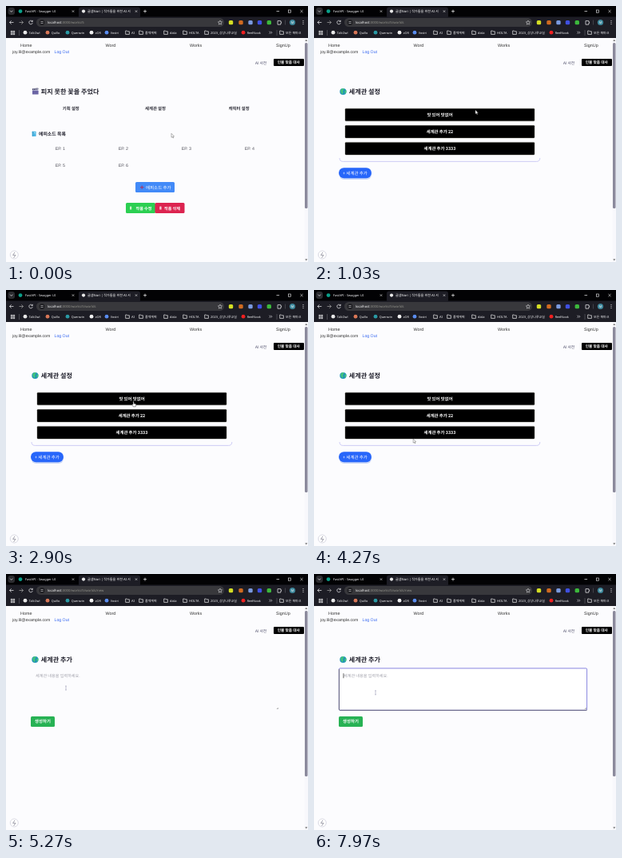
Animation, 378 px wide and 320 px high, one loop 8000 ms. Source, as an HTML page:

```html
<!DOCTYPE html>
<html lang="en">
<head>
<meta charset="utf-8">
<style>
  html, body { margin: 0; width: 100%; height: 100%; overflow: hidden; background: #fcfcfe; }
  svg { display: block; width: 100vw; height: 100vh; }
  text { font-family: "Noto Sans", "Noto Sans CJK KR", "Noto Sans CJK", sans-serif; text-rendering: geometricPrecision; white-space: pre; }
  .web { font-family: "Liberation Sans", "Noto Sans CJK KR", "Noto Sans CJK", sans-serif; }
  .ko { font-family: "Noto Sans CJK KR", "Noto Sans CJK", sans-serif; }
</style>
</head>
<body>
<svg id="stage" viewBox="0 0 378 320"></svg>
<script>
// y is the vertical middle of the line
const text = (x, y, size, str, fill, { cls = '', bold = 0, mid = 0, id = '' } = {}) =>
  `<text id="${id}" class="${cls}" x="${x}" y="${y + size * 0.37}" font-size="${size}" fill="${fill}"
    font-weight="${bold ? 700 : 400}" text-anchor="${mid ? 'middle' : 'start'}">${str}</text>`;
const ko = (x, y, size, str, fill, bold = 1, mid = 0) => text(x, y, size, str, fill, { cls: 'ko', bold, mid });
const web = (x, y, size, str, fill) => text(x, y, size, str, fill, { cls: 'web' });
const box = (x, y, w, h, fill, r = 0, more = '') =>
  `<rect x="${x}" y="${y}" width="${w}" height="${h}" rx="${r}" fill="${fill}" ${more}/>`;
const dot = (x, y, r, fill) => `<circle cx="${x}" cy="${y}" r="${r}" fill="${fill}"/>`;
const line = (d, color, w = 0.7) => `<path d="${d}" fill="none" stroke="${color}" stroke-width="${w}"/>`;
const cross = (x, y, r) => line(`M${x - r} ${y - r}l${2 * r} ${2 * r}m0 ${-2 * r}l${-2 * r} ${2 * r}`, '#eee', 0.6);
const folder = x => line(`M${x - 2.3} 31h1.8l.7.8h2.2v3.6h-4.7z`, '#eee', 0.7);

function browser() {
  const ui = '#f4f4f6', bar = '#1d1d25';
  const marks = [[24, '#e8e8e8', 'TalkOwl'], [52, '#d97757', 'Quillo'], [77, '#2a9aa5', 'Querovin'],
    [107, '#f0f0f0', 'zOR'], [126, '#5a8df0', 'Vostri'], [297, '#f02020', 'ReelNook']];
  const folders = [[152, 'AI'], [169, '플젝계획'], [200, 'data'], [224, 'HOLTA'], [251, '2023_상상나루교실'], [345, '모든 북마크']];
  const tools = [[281.5, '#d4de24'], [294, '#d06a20'], [306, '#7a9ae0'], [317.5, '#3f50e0'], [329.3, '#3cb83c']];
  return box(0, 0, 378, 14, '#020204') + box(0, 13.5, 378, 26.5, bar) +
    box(91, 1.5, 77, 14, bar, 3) +
    box(2.5, 2, 8.5, 9, '#2c2c30', 3) + line('M5 5.7l1.7 1.7 1.7-1.7', ui) +
    dot(18, 6.6, 2.4, '#0aa08a') + text(24, 6.6, 3.9, 'FastAPI - Swagger UI', ui) + cross(84, 6.6, 1.2) +
    dot(97, 6.6, 2.1, '#e8e8e8') + text(102, 6.6, 4.1, '글샘Nori | 작가들을 위한 AI 서', '#fff') + cross(163, 6.6, 1.2) +
    line('M172 6.6h4m-2-2v4M338.5 6.6h3.6', ui) + box(353.3, 5, 3.2, 3.2, 'none', 0, `stroke="${ui}" stroke-width=".6"`) + cross(370, 6.6, 1.6) +
    line('M9.5 20.5h-5m2.2-2.2l-2.2 2.2 2.2 2.2', ui) + line('M16.5 20.5h5m-2.2-2.2l2.2 2.2-2.2 2.2', '#aaa') +
    line('M33 19.2a2.3 2.3 0 1 0 .3 2M33.3 17.8v1.8h-1.8', ui) +
    box(38, 15, 235, 11, '#38383c', 5.5) + dot(45, 20.5, 3.5, '#202024') + line('M43.5 19.5h3m-3 2h3', ui, 0.5) +
    text(52, 20.5, 4.2, '', '#94948c', { id: 'url' }) +
    line('M268 18l.7 1.7 1.8.2-1.3 1.3.3 1.9-1.5-.9-1.6.9.3-1.9-1.3-1.3 1.8-.2z', ui, 0.5) +
    tools.map(([x, c]) => box(x - 2.7, 17.9, 5.4, 5.4, c, 1.5)).join('') +
    line('M340 18.6h3.8v1.2h.8v1.6h-.8v1.8H340z', ui) + line('M349.5 17.5v6', '#66666c', 0.5) +
    dot(358.5, 20.5, 3.6, '#3f8a9e') + text(358.5, 20.5, 4, 'M', '#fff', { mid: 1 }) +
    [18.5, 20.5, 22.5].map(y => dot(372, y, 0.6, ui)).join('') +
    [[6.2, 31.2], [9, 31.2], [6.2, 34], [9, 34]].map(([x, y]) => box(x, y, 1.8, 1.8, 'none', 0, `stroke="${ui}" stroke-width=".6"`)).join('') +
    line('M16.5 30v7M339 30v7', '#77777c', 0.5) +
    marks.map(([x, c, s]) => dot(x, 33.2, 2.4, c) + text(x + 4.7, 33.2, 3.8, s, ui)).join('') +
    folders.map(([x, s]) => folder(x) + text(x + 5, 33.2, 4, s, ui)).join('') +
    line('M329.5 31.7l1.4 1.5-1.4 1.5m2-3l1.4 1.5-1.4 1.5', ui, 0.6);
}

function frame() {
  const nav = [[18, 'Home'], [124.5, 'Word'], [230, 'Works'], [338, 'SignUp']];
  return box(0, 40, 378, 280, '#fcfcfe') +
    nav.map(([x, s]) => web(x, 49, 5.4, s, '#333')).join('') +
    web(8, 57, 5.2, 'joy.lil@example.com', '#333') + web(60.5, 57, 5.2, 'Log Out', '#2f62f0') +
    ko(312, 71, 4.8, 'AI 사전', '#4a4a66', 0) +
    box(335, 66, 38, 9, '#000', 1) + ko(353.8, 70.6, 4.7, '인물 맞춤 대사', '#fff', 1, 1) +
    box(373.6, 40, 4.4, 280, '#f8f8fc') + box(374, 46, 3.5, 207, '#8b8a9c', 1.5) +
    '<path d="M374.3 44l1.5-2.2 1.5 2.2zM374.3 316.3l1.5 2.2 1.5-2.2z" fill="#777"/>' +
    '<circle cx="10.3" cy="311" r="5" fill="#fff" stroke="#d2d2de" stroke-width=".8"/>' +
    line('M11 307.8l-2.4 3.6h3.4l-2.4 3.4', '#77778a', 0.7);
}

const globe = dot(36.4, 107, 4.1, '#1f93b8') +
  '<path d="M33.2 105.2q1.6-2.6 4-2.2l.4 1.7-1.7 1.4.8 1.9-1.2 2.4-1.6-2.2zM38.3 106.2l2-1.2.2 2.8-1.8 2.3z" fill="#45c47c"/>';
const title = s => ko(43.8, 107, 8.1, s, '#20202c');

function workPage() {
  const clapper = box(33, 105.6, 7.6, 5, '#6a64a4', 0.7) + box(33, 103.4, 7.6, 2, '#4a4a70', 0.5, 'transform="rotate(-8 33 105)"') +
    line('M34.4 104.8l1-2m1.4 1.8l1-2m1.2 1.6l.8-1.8', '#e4e4ee', 0.7);
  const notebook = box(32.6, 156.7, 5, 6.4, '#4fb8e4', 0.6) + line('M33.5 156.7v6.4', '#2f86b4', 0.5) + line('M35 158.5h1.8', '#d8f0fa', 0.7);
  const episodes = [0, 1, 2, 3, 4, 5].map(i =>
    web(61.7 + (i % 4) * 79, i < 4 ? 178 : 198.7, 5.3, 'EP. ' + (i + 1), '#50505a')).join('');
  return clapper + title('피지 못한 꽃을 주었다') +
    [[81.3, '기획 설정'], [187, '세계관 설정'], [291.7, '캐릭터 설정']].map(([x, s]) => ko(x, 128.3, 5.4, s, '#2c2c36', 1, 1)).join('') +
    notebook + ko(41, 160, 5.9, '에피소드 목록', '#20202c') + episodes +
    box(162, 220, 49, 13, '#428af8', 1.5) + line('M168 226.6h4.4m-2.2-2.2v4.4', '#9a3f78', 1.3) + ko(175, 226.6, 5.5, '에피소드 추가', '#fff', 0) +
    box(150, 246, 37, 13, '#2ccf52', 1.5) + box(155, 250.6, 2.2, 4, '#c9f2c4', 0.6) + ko(162.5, 252.8, 5.1, '작품 수정', '#fff') +
    box(186.5, 246, 37, 13, '#dc2450', 1.5) + box(192.2, 250.6, 2.4, 4, '#f3c9d4', 0.4) + ko(198, 252.8, 5.1, '작품 삭제', '#fff');
}

const worldsPage = () => globe + title('세계관 설정') +
  line('M32 190q0 4.4 4.4 4.4h242q4.4 0 4.4-4.4', '#c3c1f4', 0.8) +
  ['맛 있어 맛없어', '세계관 추가 22', '세계관 추가 3333'].map((s, i) =>
    box(39, 128.2 + i * 21.1, 237, 15.6, '#000', 1, 'stroke="#55554a" stroke-width=".4"') +
    ko(157.5, 136 + i * 21.1, 5.4, s, '#fff', 1, 1)).join('') +
  box(31.5, 204.5, 40.5, 12.5, '#c9d6f8', 6.2) + box(31, 202.2, 41, 13, '#2766fa', 6.5) + ko(51.5, 208.7, 5.5, '+ 세계관 추가', '#fff', 0, 1);

const newPage = () => globe + title('세계관 추가') +
  `<g id="focus">${box(31.4, 117.9, 310.2, 52.4, '#fff', 1.2, 'stroke="#6a68d8" stroke-width=".8"')}${line('M31.4 119v50.2q0 1.1 1.1 1.1h309', '#55555f', 0.8)}</g>` +
  ko(37, 127.2, 5.15, '세계관 내용을 입력하세요.', '#a2a2ac', 0) +
  line('M338.8 169l2-2m-.9 2l.9-.9', '#666', 0.5) +
  box(31, 178, 30, 13, '#27b254', 1.5) + ko(46, 184.5, 5.4, '생성하기', '#fff', 1, 1) +
  box(36.6, 124.2, 0.7, 6, '#222', 0, 'id="caret"');

const pointers = {
  arrow: '<path d="M0 0V5L1.2 4 2 5.7 2.8 5.4 2 3.7H3.5Z" fill="#fff" stroke="#444" stroke-width=".4"/>',
  hand: '<path d="M-.6 0q.6-.7 1.1 0v2.3l2.2.5q.5.2.4.9L2.6 6.2H-.4L-2 3.7q.2-.9 1.4 0z" fill="#fff" stroke="#333" stroke-width=".45"/>',
  beam: line('M-.9-2.5h1.8M0-2.5v5M-.9 2.5h1.8', '#8484a4', 0.5)
};

const group = (id, body) => `<g id="${id}">${body}</g>`;
stage.innerHTML = frame() + browser() + group('work', workPage()) + group('worlds', worldsPage()) + group('create', newPage()) +
  group('pointer', Object.entries(pointers).map(([k, v]) => group(k, v)).join(''));

const el = id => document.getElementById(id);
const show = (id, on) => el(id).setAttribute('display', on ? 'inline' : 'none');

// time, x, y, pointer shape from that time on
const path = [
  [0, 207, 159.3, 'arrow'], [30, 207, 159.3, 'arrow'], [650, 202.5, 133, 'hand'], [760, 202, 130, 'hand'],
  [960, 202, 130, 'arrow'], [1400, 202, 130, 'arrow'], [1700, 131, 152.7, 'arrow'], [2230, 140, 156, 'arrow'],
  [2600, 156, 143, 'hand'], [2930, 160, 139.3, 'hand'], [3100, 160, 139.3, 'hand'], [3400, 158, 156.5, 'hand'],
  [3600, 158, 156.5, 'hand'], [3730, 160, 173.5, 'hand'], [3899, 160, 173.5, 'hand'], [3900, 164, 154.5, 'hand'],
  [4170, 164, 154.5, 'arrow'], [4270, 124.5, 186, 'arrow'], [4480, 54, 207, 'hand'], [4700, 52, 206, 'arrow'],
  [5000, 54, 202, 'arrow'], [5180, 70, 158, 'beam'], [5270, 75, 142.5, 'beam'], [5700, 76, 146, 'beam'],
  [6030, 77, 148.3, 'beam'], [8000, 77, 148.3, 'beam']
];
const WORLDS = 960, CREATE = 4700, FOCUS = 5700;

function draw(now) {
  const t = now % 8000;
  const i = path.findIndex(p => p[0] > t) - 1;
  const [t0, x0, y0, shape] = path[i], [t1, x1, y1] = path[i + 1];
  const k = (t - t0) / (t1 - t0);
  el('pointer').setAttribute('transform', `translate(${x0 + (x1 - x0) * k} ${y0 + (y1 - y0) * k})`);
  for (const name in pointers) show(name, name === shape);

  show('work', t < WORLDS);
  show('worlds', t >= WORLDS && t < CREATE);
  show('create', t >= CREATE);
  show('focus', t >= FOCUS);
  show('caret', t >= FOCUS && Math.floor((t - FOCUS) / 500) % 2 === 0);

  const route = t < WORLDS ? '' : t < CREATE ? '/worlds' : '/worlds/new';
  el('url').innerHTML = `<tspan fill="#fff">localhost</tspan>:3000/works/5${route}`;
  requestAnimationFrame(draw);
}
draw(performance.now());
</script>
</body>
</html>
```
